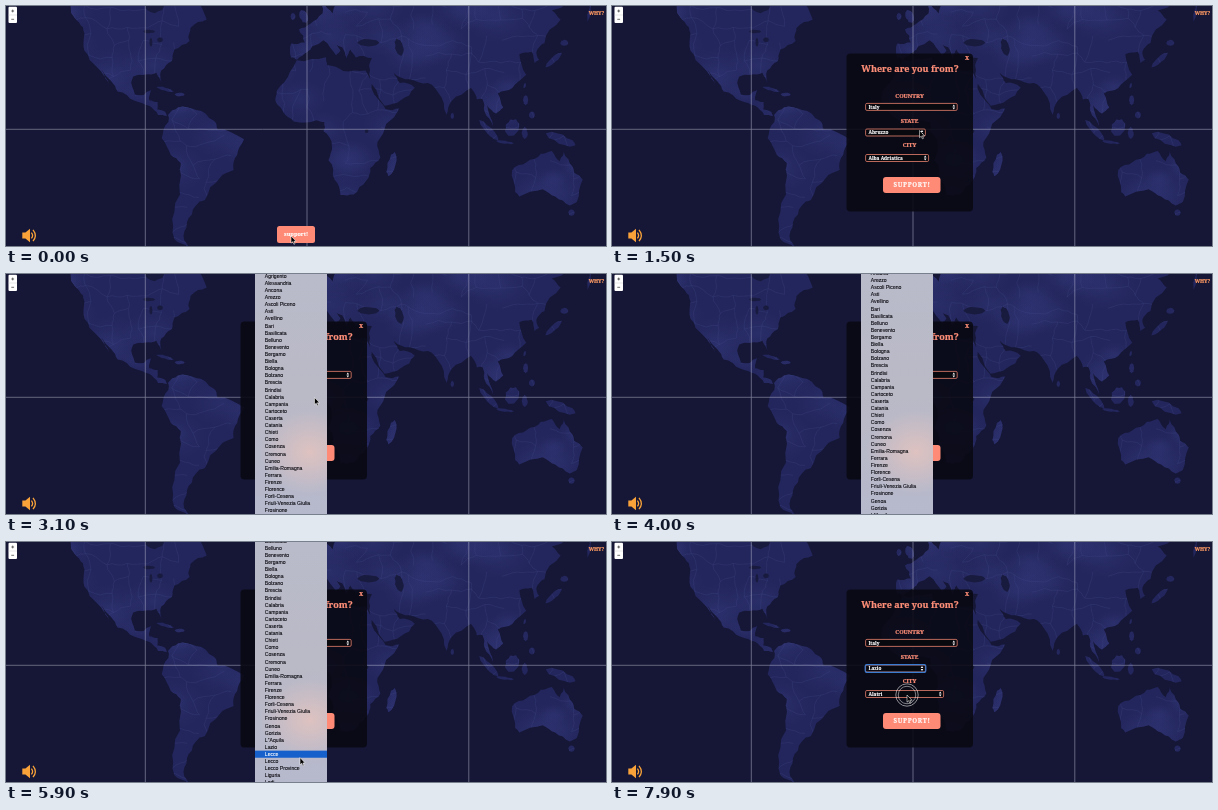
An HTML page that plays this animation: 600 px wide and 240 px high, repeating every 8000 ms.

```html
<!DOCTYPE html>
<html lang="en">
<head>
<meta charset="utf-8">
<title>Support map</title>
<style>
  html, body { margin: 0; width: 100%; height: 100%; overflow: hidden; background: #161737; }
  svg { display: block; width: 100%; height: 100%; }
  .slab { font-family: "Noto Serif", "Liberation Serif", serif; font-weight: 800; }
  .mid { text-anchor: middle; }
  .coral { fill: #ff8f78; stroke: #ff8f78; stroke-width: .22; }
  .white { fill: #fff; stroke: #fff; stroke-width: .15; }
  .select { fill: #08080f; stroke: #e6806d; stroke-width: .8; }
  .menu { font: 5.1px "Liberation Sans", Arial, sans-serif; }
</style>
</head>
<body>
<svg viewBox="0 0 600 240" preserveAspectRatio="none">
  <defs>
    <clipPath id="landClip"><path id="landShape"/></clipPath>
    <radialGradient id="glow">
      <stop offset="0" stop-color="#3a4088" stop-opacity=".28"/>
      <stop offset="1" stop-color="#3a4088" stop-opacity="0"/>
    </radialGradient>
    <linearGradient id="glass" x2="0" y2="1">
      <stop offset="0" stop-color="#b9bbca"/>
      <stop offset=".5" stop-color="#bab9c6"/>
      <stop offset="1" stop-color="#b6b9cc"/>
    </linearGradient>
    <radialGradient id="blush">
      <stop offset="0" stop-color="#e2c3bf" stop-opacity=".9"/>
      <stop offset="1" stop-color="#e2c3bf" stop-opacity="0"/>
    </radialGradient>
    <clipPath id="menuClip"><rect id="menuArea" x="249" width="72" height="250" rx="2"/></clipPath>
  </defs>

  <rect width="600" height="240" fill="#161737"/>
  <path id="land" fill="#23265c"/>
  <g clip-path="url(#landClip)">
    <g id="relief" fill="url(#glow)"></g>
    <path id="borders" fill="none" stroke="#454b8d" stroke-width=".5" opacity=".5"/>
  </g>
  <path id="water" fill="#181a3e"/>
  <path d="M139.3 0V240M301 0V240M462.8 0V240M0 123.3H600" stroke="#d5d6e6" stroke-width=".8" opacity=".52"/>

  <rect x="2.5" y=".8" width="8.5" height="16.2" rx="1" fill="#fff"/>
  <path d="M2.5 9H11" stroke="#ccc" stroke-width=".5"/>
  <path d="M5.3 5H8.1M6.7 3.6V6.4M5.3 13.3H8.1" stroke="#333" stroke-width=".7"/>
  <text class="slab mid" x="590.5" y="9" font-size="5" fill="#ff9a63" stroke="#ff9a63" stroke-width=".2">WHY?</text>
  <path d="M16.3 226.6H19.4L24 222.8V236.2L19.4 232.4H16.3Z" fill="#f8a239"/>
  <path d="M25.4 226.6Q27.8 229.5 25.4 232.4M27 223.8Q31.6 229.5 27 235.2" fill="none" stroke="#f8a239" stroke-width="1.3"/>

  <g id="opener">
    <rect x="271" y="220" width="38" height="17" rx="2.5" fill="#ff8b77"/>
    <text class="slab mid white" x="290" y="230" font-size="5.5">support!</text>
  </g>

  <g id="panel">
    <rect x="234.5" y="47.5" width="126.5" height="158" rx="4" fill="#090914" opacity=".9"/>
    <text class="slab mid coral" x="298" y="66" font-size="9">Where are you from?</text>
    <text class="slab mid coral" x="355" y="54.2" font-size="6.4">x</text>
    <text class="slab mid coral" x="297.6" y="92.1" font-size="5.7">COUNTRY</text>
    <text class="slab mid coral" x="297.6" y="116.9" font-size="5.6">STATE</text>
    <text class="slab mid coral" x="297.6" y="141.4" font-size="5.6">CITY</text>
    <g id="selects"></g>
    <rect id="focus" x="253.2" y="122.6" width="60.6" height="7.8" rx="1.6" fill="none" stroke="#3a7cd0" stroke-width="1.2"/>
    <rect x="271" y="171" width="57.5" height="16" rx="3" fill="#ff8b77"/>
    <text class="slab mid white" x="300" y="181.2" font-size="6.2" letter-spacing=".65">SUPPORT!</text>
  </g>

  <g id="menu" class="menu" clip-path="url(#menuClip)">
    <rect x="249" width="72" height="240" fill="url(#glass)"/>
    <ellipse cx="304" cy="178" rx="50" ry="42" fill="url(#blush)"/>
    <rect id="bar" x="249" width="72" height="7.1" fill="#1660cc"/>
    <g id="items" stroke-width=".1"></g>
  </g>

  <g id="ring" fill="none" stroke="#fff">
    <circle id="outer" stroke-width=".9"/>
    <circle id="inner" stroke-width=".8"/>
  </g>
  <path id="cursor" d="M0 0V7.2L1.7 5.7L2.9 8.3L4 7.8L2.9 5.3H5.1Z" fill="#000" stroke="#fff" stroke-width=".55"/>
</svg>

<script>
const $ = id => document.getElementById(id);
const NS = "http://www.w3.org/2000/svg";
const add = (parent, tag, attrs, text = "") => {
  const el = document.createElementNS(NS, tag);
  for (const k in attrs) el.setAttribute(k, attrs[k]);
  el.textContent = text;
  parent.append(el);
  return el;
};
const set = (id, attrs) => { for (const k in attrs) $(id).setAttribute(k, attrs[k]); };

let seed = 7;
const random = () => (seed = seed * 16807 % 2147483647) / 2147483647;

// Mercator projection and coastlines roughened by midpoint displacement
const project = ([lon, lat]) => [
  301.3 + 1.797 * lon,
  123.3 - 103 * Math.log(Math.tan(Math.PI / 4 + lat * Math.PI / 360))
];
function roughen(points, depth, closed) {
  if (!depth) return points;
  const out = points.flatMap((p, i) => {
    if (!closed && i === points.length - 1) return [p];
    const q = points[(i + 1) % points.length];
    const k = (random() - .5) * .24;
    return [p, [(p[0] + q[0]) / 2 + (q[1] - p[1]) * k, (p[1] + q[1]) / 2 - (q[0] - p[0]) * k]];
  });
  return roughen(out, depth - 1, closed);
}
const toPath = points => "M" + points.map(p => p.map(v => v.toFixed(1)).join(" ")).join("L");
const coast = text => toPath(roughen(
  text.trim().split(/\s+/).map(p => project(p.split(",").map(Number))), 2, true)) + "Z";

// Small land or water body: centre in degrees, radii in pixels, tilt in degrees
function blob([lon, lat, rx, ry, tilt = 0]) {
  const [cx, cy] = project([lon, lat]);
  const s = Math.sin(tilt * Math.PI / 180), c = Math.cos(tilt * Math.PI / 180);
  const points = Array.from({ length: 8 }, (_, i) => {
    const a = i * Math.PI / 4, x = rx * Math.cos(a), y = ry * Math.sin(a);
    return [cx + x * c - y * s, cy + x * s + y * c];
  });
  return toPath(roughen(points, 1, true)) + "Z";
}

const continents = [
  // North America
  `-133,58 -127,51 -124,47 -124,40 -117,32.6 -110,23 -114.7,31.5 -109,25.8 -105.5,20.5 -96,15.7 -88,13
   -83,8 -78,7.5 -79,9.5 -83.5,11 -83.3,15 -88,16 -87,21.4 -91,18.7 -96,19 -97.7,24 -97,28 -90,29.2 -84,30
   -81,25.2 -81.3,31 -75.6,35.3 -74,40.5 -65.5,44 -65,49 -56,52 -62,59`,
  // South America
  `-77.5,8 -72,12 -62,10.6 -52,4.8 -50,0 -35.2,-5.5 -39,-14 -41,-22 -48.6,-26 -57,-36.5 -62,-39 -67,-46
   -68.5,-52.4 -66,-55 -74,-52 -74,-42 -70.3,-25 -70.4,-18.4 -76,-14 -81,-5 -77.3,4`,
  // Africa
  `-5.9,35.8 -9.6,30.5 -17,21 -17.4,14.7 -13,9 -7.5,4.4 5,5 9.5,4 9,-1 13.7,-9 11.8,-17 15.2,-27 18.5,-34.3
   25.8,-34 32.7,-27.5 35,-21 40.6,-15.5 39,-7 51.2,11.5 43.5,11.3 37.3,19 32.4,31 20,30.8 11,33.6 10.3,37.2`,
  // Europe and Asia
  `-9,43 -9,37 -5.6,36 0,39.5 3,42 9,44.3 16,38 18.4,40.2 12.4,45 19.4,41.5 22,36.8 24,40.5 27,37 36,36.8
   34.5,29.5 43,13 52,16 59.8,22.5 51.5,25 48,30 57,26.8 67,25 72.8,20 77.5,8.1 80.3,15.5 91,22.5 94.3,16.3
   97.5,16.5 98.6,10 103.5,1.4 100,13.3 105,8.7 109,12 106,19.5 114,22.4 121.8,29 118,38.5 124.8,39.6
   126.5,34.5 129,36 127.5,39.7 132,43.2 141,52 136,55 155,60 156,51.2 163,60 21,60 14,54 8,57 8.5,54
   1.7,50.5 -4.7,48.4 -1.4,43.4`,
  // Australia
  `114,-22 115.7,-33 118,-35 131,-31.6 138,-35 146,-39 150,-37.3 153.2,-27 146,-18.5 142.5,-10.8 140.5,-17.5
   136,-12 130,-13.5 122,-18`
];
const islands = [[-2, 53, 4, 7, -20], [-8, 53, 2.5, 3.5], [-79, 21.7, 9, 1.3, 15], [-71, 19, 5, 1.7],
  [46.8, -19, 4, 12.5, 15], [80.7, 7.5, 1.7, 3], [101, -.5, 14, 3.2, 47], [110, -7.2, 9, 1.5, 8],
  [114, 1, 7, 9, 25], [121, -2, 3, 6], [141, -5.5, 16, 5, 22], [121.5, 16, 2.6, 5], [125, 8, 3, 3.5],
  [121, 23.7, 1.1, 2.7, 15], [137, 36, 11, 2.6, -42], [143, 43.3, 4, 3], [147, -42, 3.2, 3.2]];
const lakes = [[-85, 57.5, 11, 11], [-88, 47.7, 6, 1.8], [-87, 43.5, 1.5, 4.5], [-82, 44.5, 3, 2.5],
  [34, 43.3, 11, 3.6], [51, 41.5, 4, 9, -15], [33, -1, 2, 2]];

const landPath = continents.map(coast).join("") + islands.map(blob).join("");
set("land", { d: landPath });
set("landShape", { d: landPath });
set("water", { d: lakes.map(blob).join("") });

for (let i = 0; i < 90; i++) {
  const rx = 14 + 26 * random();
  add($("relief"), "ellipse", { cx: 600 * random(), cy: 240 * random(), rx, ry: rx * .7 });
}

// Borders: a jittered grid with some edges missing
const CELL = 17;
const nodes = Array.from({ length: 15 }, (_, row) => Array.from({ length: 37 }, (_, col) =>
  [(col + .8 * random() - .4) * CELL, (row + .8 * random() - .4) * CELL]));
let borderPath = "";
nodes.forEach((line, row) => line.forEach((p, col) => {
  for (const q of [line[col + 1], nodes[row + 1]?.[col]])
    if (q && random() < .6) borderPath += toPath(roughen([p, q], 2, false));
}));
set("borders", { d: borderPath });

// Drop-down fields
function field(y, text, width) {
  const box = add($("selects"), "rect", { class: "select", x: 253.6, y, height: 7, rx: 1.3 });
  const label = add($("selects"), "text", { class: "slab white", "font-size": 4.7, x: 256.4, y: y + 5.1 });
  const arrows = add($("selects"), "path", { d: "M-1.3 -.5L0 -2.5L1.3 -.5ZM-1.3 .5L0 2.5L1.3 .5Z", fill: "#fff" });
  const update = (value, w) => {
    label.textContent = value;
    box.setAttribute("width", w);
    arrows.setAttribute("transform", `translate(${250.2 + w} ${y + 3.5})`);
  };
  update(text, width);
  return update;
}
field(97.4, "Italy", 91.6);
const stateField = field(123, "Abruzzo", 59.8);
const cityField = field(148.5, "Alba Adriatica", 63);

const PITCH = 7.11;
const places = `Abruzzo,Agrigento,Alessandria,Ancona,Arezzo,Ascoli Piceno,Asti,Avellino,Bari,Basilicata,Belluno,
Benevento,Bergamo,Biella,Bologna,Bolzano,Brescia,Brindisi,Calabria,Campania,Cartoceto,Caserta,Catania,Chieti,Como,
Cosenza,Cremona,Cuneo,Emilia-Romagna,Ferrara,Firenze,Florence,Forli-Cesena,Friuli-Venezia Giulia,Frosinone,Genoa,
Gorizia,L''Aquila,Lazio,Lecce,Lecco,Lecco Province,Liguria,Lodi,Lombardia`.split(",").map(s => s.trim());
const rows = places.map((name, i) => add($("items"), "text", { x: 258.8, y: i * PITCH + 1.8 }, name));

// Piecewise track of [time, ...values]
const linear = p => p;
const smooth = p => p * p * (3 - 2 * p);
function track(keys, t, ease = linear) {
  const i = keys.findIndex(k => k[0] > t);
  if (i <= 0) return keys.at(i).slice(1);
  const a = keys[i - 1], b = keys[i];
  const p = ease((t - a[0]) / (b[0] - a[0]));
  return a.slice(1).map((v, j) => v + (b[j + 1] - v) * p);
}

const pointer = [[600, 285, 230], [1500, 307.5, 124.5], [2000, 307.5, 124.5], [2500, 308.5, 123.5],
  [3500, 308.5, 123.5], [3900, 305, 250], [4400, 300, 250], [4800, 294, 213], [5300, 294, 223],
  [6200, 294, 213], [6400, 295, 206], [7400, 295, 206], [7900, 295, 153]];
const scroll = [[2100, 126.5], [2500, 14], [2600, 14], [3100, -5.1], [3600, -5.1], [4000, -22.1], [4600, -65.1]];
const panelFade = [[100, 0], [400, 1]];
const menuFade = [[7100, 1], [7400, 0]];
const clicks = [100, 1600, 6800, 7900];

function draw(t) {
  const [x, y] = track(pointer, t, smooth);
  set("cursor", { transform: `translate(${x} ${y})` });

  const [shown] = track(panelFade, t);
  set("panel", { opacity: shown });
  set("opener", { opacity: 1 - shown });

  const chosen = t >= 7200;
  stateField(chosen ? "Lazio" : "Abruzzo", 59.8);
  cityField(chosen ? "Alatri" : "Alba Adriatica", chosen ? 78 : 63);
  set("focus", { opacity: chosen ? 1 : 0 });

  const [top] = track(scroll, t);
  set("menu", { opacity: t < 2100 ? 0 : track(menuFade, t)[0] });
  set("menuArea", { y: Math.max(-4, top - 6) });
  set("items", { transform: `translate(0 ${top})` });
  const lit = t >= 4700 && t < 7100 ? Math.round((y - top) / PITCH) : -1;
  set("bar", { y: top + lit * PITCH - PITCH / 2, opacity: lit < 0 ? 0 : 1 });
  rows.forEach((row, i) => {
    const color = i === lit ? "#fff" : "#08080e";
    row.setAttribute("fill", color);
    row.setAttribute("stroke", color);
  });

  const click = clicks.find(c => t >= c && t < c + 300);
  const age = click === undefined ? 1 : (t - click) / 300;
  const r = 11.2 + 36 * age;
  set("ring", { transform: `translate(${x} ${y})`, opacity: .6 * (1 - age) });
  set("outer", { r });
  set("inner", { r: r * .78 });
}

const start = performance.now();
function tick() {
  const t = (performance.now() - start) % 8000;
  draw(Math.floor(t / 100) * 100);
  requestAnimationFrame(tick);
}
tick();
</script>
</body>
</html>
```
